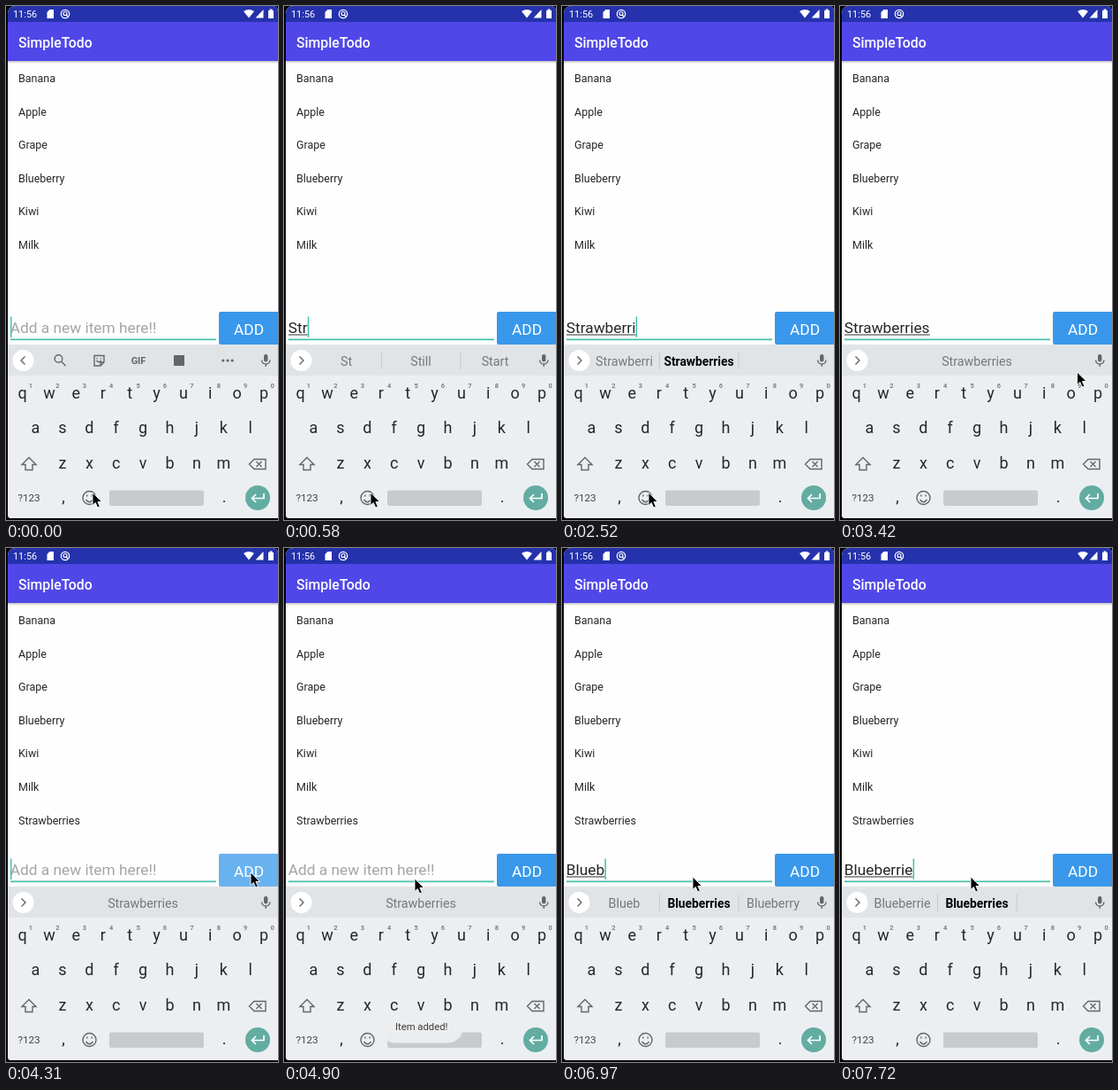
Write an HTML page that moves like this. It is 308 by 580 pixels and loops after 8 s.

```html
<!DOCTYPE html>
<html lang="en">
<head>
<meta charset="utf-8">
<title>SimpleTodo</title>
<style>
  html, body { margin: 0; width: 308px; height: 580px; overflow: hidden; background: #000; }
  svg { display: block; font-family: Roboto, sans-serif; }
  text { white-space: pre; }
  .mid { text-anchor: middle; }
  .line { fill: none; stroke: #60666a; stroke-width: 1.4; }
  .item { font-size: 12.5px; fill: #262626; }
  .key { font-size: 18px; fill: #22282c; }
  .digit { font-size: 7.5px; font-weight: 500; fill: #686e72; }
  .sug { font-size: 14.25px; fill: #74787b; }
  .sug.best { font-size: 13.8px; font-weight: 700; fill: #000; }
</style>
</head>
<body>
<svg width="308" height="580" viewBox="0 0 308 580">
  <defs>
    <clipPath id="screen"><path d="M2 9Q2 0 11 0H302Q308 0 308 6V578H6Q2 578 2 574Z"/></clipPath>
    <linearGradient id="shade" x2="0" y2="1">
      <stop stop-color="#000" stop-opacity=".25"/><stop offset="1" stop-color="#000" stop-opacity="0"/>
    </linearGradient>
  </defs>
  <g clip-path="url(#screen)">
    <rect width="308" height="580" fill="#fefefe"/>
    <rect y="62" width="308" height="3" fill="url(#shade)"/>
    <rect y="18" width="308" height="44" fill="#5047e8"/>
    <rect width="308" height="18" fill="#2532ac"/>

    <!-- status bar -->
    <g fill="#fff">
      <text x="8" y="13" font-size="10.9">11:56</text>
      <path d="M46.5 7L49.5 4H54V14H46.5Z"/>
      <path d="M269 6Q275 2 281 6L275 13.5Z"/>
      <path d="M282.500 13.5L291.500 4V13.5Z"/>
      <path d="M297 5H298.500V3.500H301.500V5H303V14H297Z"/>
    </g>
    <g fill="none" stroke="#fff" stroke-width="1.2">
      <circle cx="67" cy="9" r="4.700"/><circle cx="67" cy="8.500" r="2"/><path d="M68 10L70 12"/>
    </g>
    <text x="14" y="46.5" font-size="15.8" font-weight="500" fill="#fff">SimpleTodo</text>

    <g id="list"></g>

    <!-- entry field -->
    <text id="entry" x="4.800" y="369" font-size="17.3"></text>
    <rect id="under" x="5" y="370.5" height="1" fill="#333"/>
    <rect x="5" y="375.500" width="233" height="1.700" fill="#45bfa8"/>
    <rect id="caret" y="350.500" width="1.500" height="23.500" fill="#45bfa8"/>
    <rect id="button" x="241" y="345" width="70" height="37" rx="2"/>
    <text class="mid" x="275" y="370.500" font-size="17.3" fill="#fff">ADD</text>

    <!-- keyboard -->
    <rect y="382" width="308" height="198" fill="#eceff1"/>
    <rect y="382" width="308" height="35" fill="#e1e4e7"/>
    <circle cx="19.500" cy="400" r="12" fill="#fff"/>
    <path id="chevron" class="line" stroke-width="1.600"/>
    <g id="tools">
      <g class="line">
        <circle cx="59.500" cy="398" r="4.300"/><path d="M62.700 401.200L67.500 406"/>
        <path d="M100 394.500H111V402L107 406H100Z M111 402H107V406 M102.500 400Q105 403.500 108 400 M103 397.200V398.600 M107.500 397.200V398.600"/>
      </g>
      <text class="mid" x="150" y="403.500" font-size="11" font-weight="700" fill="#60666a">GIF</text>
      <rect x="190" y="394" width="12" height="12" fill="#60666a"/>
      <g fill="#60666a">
        <circle cx="245.800" cy="400" r="1.600"/><circle cx="251" cy="400" r="1.600"/><circle cx="256.200" cy="400" r="1.600"/>
      </g>
    </g>
    <path id="dividers" d="M110.500 391V410M200 391V410" stroke="#c7cbce"/>
    <text class="sug mid" x="70.5" y="405.5"></text>
    <text class="sug mid" x="155" y="405.5"></text>
    <text class="sug mid" x="239" y="405.5"></text>
    <rect x="292" y="393" width="4.400" height="8.500" rx="2.200" fill="#60666a"/>
    <path class="line" d="M289.500 399.500Q290 404 294.200 404T299 399.500M294.200 404V407"/>

    <g id="keys"></g>
    <path class="line" d="M26 509.500L34 517.500H30V523.500H22V517.500H18Z"/>
    <path class="line" d="M281 511.500H294V522.500H281L275.500 517ZM283.500 514L289.500 520M289.500 514L283.500 520"/>
    <text class="mid" x="26" y="559" font-size="11.7" fill="#3c4347">?123</text>
    <g class="line">
      <circle cx="94.500" cy="555" r="7.500"/><path d="M90.500 557Q94.500 562.500 98.500 557M91.800 551.500V553.500M97.200 551.500V553.500"/>
    </g>
    <rect x="117" y="546.500" width="107" height="17.500" rx="2" fill="#c8cbcd"/>
    <circle cx="285" cy="555" r="14" fill="#63aca2"/>
    <path d="M292 550V555.500H279M283 551L278.500 555.500L283 560" fill="none" stroke="#fff" stroke-width="1.700"/>

    <g id="toast">
      <rect id="pill" x="108" y="522" width="95" height="36.500" rx="18" fill="#eeeff0"/>
      <text class="mid" x="155.700" y="544" font-size="11.3" fill="#3b3b3b">Item added!</text>
    </g>
  </g>
  <path id="mouse" d="M0 0V14.500L3.300 11.500L5.700 17L8.300 15.900L5.900 10.500H10.500Z" stroke="#fff" stroke-width=".9"/>
</svg>
<script>
const $ = id => document.getElementById(id);
const LOOP = 8000;

function addText(parent, cls, x, y, str) {
  const el = document.createElementNS('http://www.w3.org/2000/svg', 'text');
  el.setAttribute('class', cls);
  el.setAttribute('x', x);
  el.setAttribute('y', y);
  el.textContent = str;
  return parent.appendChild(el);
}

const items = ['Banana', 'Apple', 'Grape', 'Blueberry', 'Kiwi', 'Milk', 'Strawberries']
  .map((name, i) => addText($('list'), 'item', 14, 86 + i * 37.6, name));

[['qwertyuiop', 18.5, 443], ['asdfghjkl', 33.5, 482], ['zxcvbnm', 64, 522]].forEach(([row, x, y], r) =>
  [...row].forEach((ch, i) => {
    const cx = x + i * 30.4;
    addText($('keys'), 'key mid', cx, y, ch);
    if (!r) addText($('keys'), 'digit mid', cx + 9.5, y - 12.5, (i + 1) % 10);
  }));
addText($('keys'), 'key mid', 65, 560, ',');
addText($('keys'), 'key mid', 247, 560, '.');

// [time, value], each held until the next
const typed = [
  [0, ''], [140, 'S'], [440, 'St'], [580, 'Str'], [880, 'Stra'], [1180, 'Straw'],
  [1630, 'Strawb'], [1930, 'Strawbe'], [2220, 'Strawber'], [2370, 'Strawberr'],
  [2520, 'Strawberri'], [2670, 'Strawberrie'], [2970, 'Strawberries'], [4170, ''],
  [5790, 'B'], [6230, 'Bl'], [6530, 'Blu'], [6680, 'Blue'], [6970, 'Blueb'],
  [7120, 'Bluebe'], [7270, 'Blueber'], [7420, 'Blueberr'], [7570, 'Blueberri'], [7720, 'Blueberrie']
];
// Suggestions: left|middle|right, * marks the best match
const hints = [
  [0, ''], [440, 'S|So|She'], [580, 'St|Still|Start'], [880, 'Str|Street|Strong'],
  [1330, 'Straw|*Strawberries|Strawberry'], [1780, 'Strawb|*Strawberries|Strawberry'],
  [1930, 'Strawbe|*Strawberries|Strawberry'], [2220, 'Strawber|*Strawberries|Strawberry'],
  [2370, 'Strawberr|*Strawberries|Strawberry'], [2520, 'Strawberri|*Strawberries|'],
  [2970, '|Strawberries|'], [5930, 'B|Be|But'], [6380, 'Bl|Blue|Black'],
  [6680, 'Blu|Blue|Blueberry'], [6820, 'Blue|Blues|Blueberry'],
  [6970, 'Blueb|*Blueberries|Blueberry'], [7270, 'Blueber|*Blueberries|Blueberry'],
  [7420, 'Blueberr|*Blueberries|Blueberry'], [7570, 'Blueberri|*Blueberries|'],
  [7720, 'Blueberrie|*Blueberries|']
];
const pointer = [
  [0, '98,549'], [3270, '172,497'], [3420, '268.5,413'], [3570, '277,375'], [3720, '277,366'],
  [4470, '262,368'], [4620, '195,374'], [4760, '148,374'], [4900, '148,373'], [5040, '148,371']
];
const caretOn = [[0, 1], [3420, 0], [4020, 1], [4620, 0], [5040, 1], [5490, 0], [5790, 1]];
const pillAlpha = [[0, 0], [4320, .3], [4470, .7], [4620, .95], [6230, .45], [6380, 0]];
const labelAlpha = [[0, 0], [4320, .3], [4470, .7], [4620, 1], [6230, .75], [6380, 0]];

const at = (track, t) => track.findLast(step => step[0] <= t)[1];
const show = (el, on) => el.style.display = on ? '' : 'none';
const slots = document.querySelectorAll('.sug');
const [pill, label] = $('toast').children;

function draw(t) {
  const text = at(typed, t), entry = $('entry');
  entry.textContent = text || 'Add a new item here!!';
  entry.setAttribute('fill', text ? '#262626' : '#a5a5a5');
  const width = text ? entry.getComputedTextLength() : 0;
  $('under').setAttribute('width', width);
  $('caret').setAttribute('x', 5 + width);
  show($('caret'), at(caretOn, t));

  const hint = at(hints, t), words = hint.split('|');
  slots.forEach((slot, i) => {
    const word = words[i] || '';
    slot.classList.toggle('best', word[0] === '*');
    slot.textContent = word.replace('*', '');
  });
  show($('tools'), !hint);
  show($('dividers'), words[0]);
  $('chevron').setAttribute('d', hint ? 'M17.500 395.500L22 400L17.500 404.500' : 'M21.500 395.500L17 400L21.500 404.500');

  show(items[6], t >= 4170);
  $('button').setAttribute('fill', t >= 4020 && t < 4320 ? '#69b2f0' : '#3998eb');
  pill.style.opacity = at(pillAlpha, t);
  label.style.opacity = at(labelAlpha, t);
  $('mouse').setAttribute('transform', `translate(${at(pointer, t)})`);
}

function tick(now) {
  draw(now % LOOP);
  requestAnimationFrame(tick);
}
draw(0);
requestAnimationFrame(tick);
</script>
</body>
</html>
```
